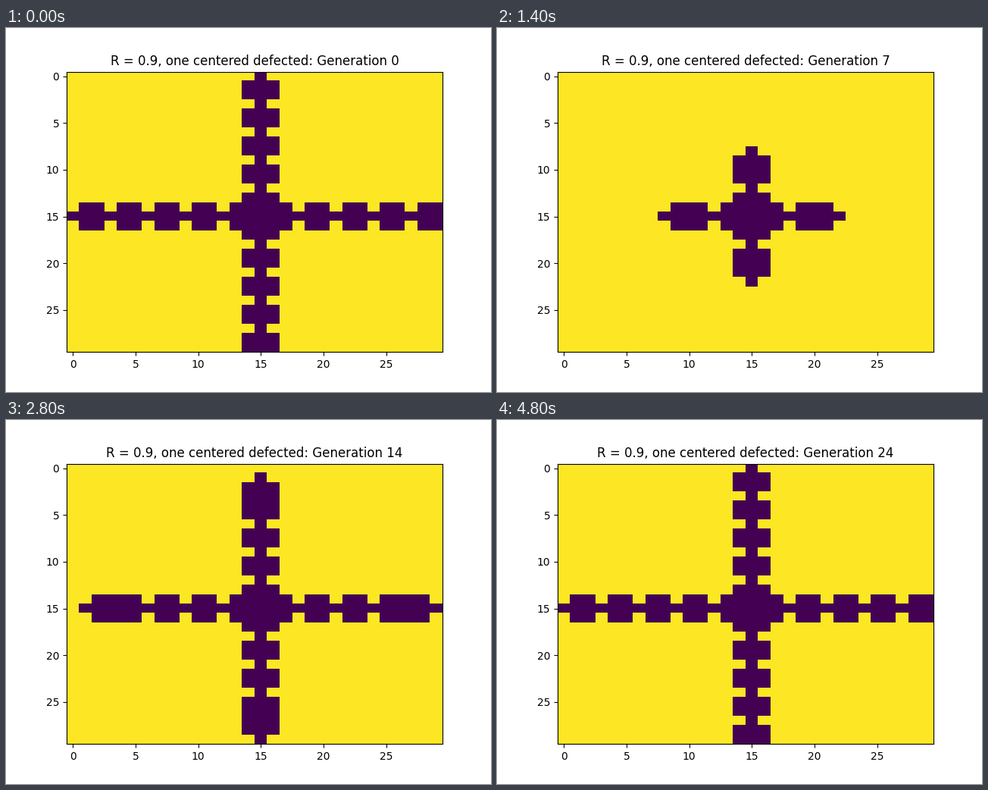
A matplotlib script that plays this animation: 640 px wide and 480 px high, repeating every 5 s.

```python
import numpy as np
import matplotlib.pyplot as plt
from matplotlib.animation import FuncAnimation

SIZE = 30
GENERATIONS = 25
ROUNDS = 7
TEMPTED, REWARD, PUNISHED, SUCKER = 0.0, 0.9, 1.0, 1.5
DEFECT, COOPERATE = 0, 1

# Years in prison over all rounds, as COST[own strategy, neighbour's strategy].
# After a first betrayal both players defect for the remaining rounds.
COST = np.array([
    [ROUNDS * PUNISHED, TEMPTED + (ROUNDS - 1) * PUNISHED],
    [SUCKER + (ROUNDS - 1) * PUNISHED, ROUNDS * REWARD],
])


def neighbours(grid):
    """The four nearest neighbours on a lattice that wraps around."""
    return [np.roll(grid, step, axis) for axis in (0, 1) for step in (1, -1)]


def evolve(grid):
    """Every player copies the cheapest strategy nearby, its own included."""
    years = sum(COST[grid, other] for other in neighbours(grid))
    all_years = np.stack([years] + neighbours(years))
    strategies = np.stack([grid] + neighbours(grid))
    best = all_years.argmin(axis=0)
    return np.take_along_axis(strategies, best[None], axis=0)[0]


def run():
    grid = np.full((SIZE, SIZE), COOPERATE)
    grid[SIZE // 2, SIZE // 2] = DEFECT
    history = [grid]
    for _ in range(GENERATIONS - 1):
        history.append(evolve(history[-1]))
    return history


history = run()
history[0] = history[-1]  # the loop opens on the settled pattern

fig, ax = plt.subplots(figsize=(6.4, 4.8), dpi=100)
image = ax.imshow(history[0], cmap="viridis", vmin=DEFECT, vmax=COOPERATE,
                  aspect="auto", interpolation="nearest")
title = ax.set_title("")


def draw(generation):
    image.set_data(history[generation])
    title.set_text(f"R = {REWARD}, one centered defected: Generation {generation}")
    return image, title


animation = FuncAnimation(fig, draw, frames=GENERATIONS, interval=200,
                          repeat=True, repeat_delay=0)
plt.show()
```
